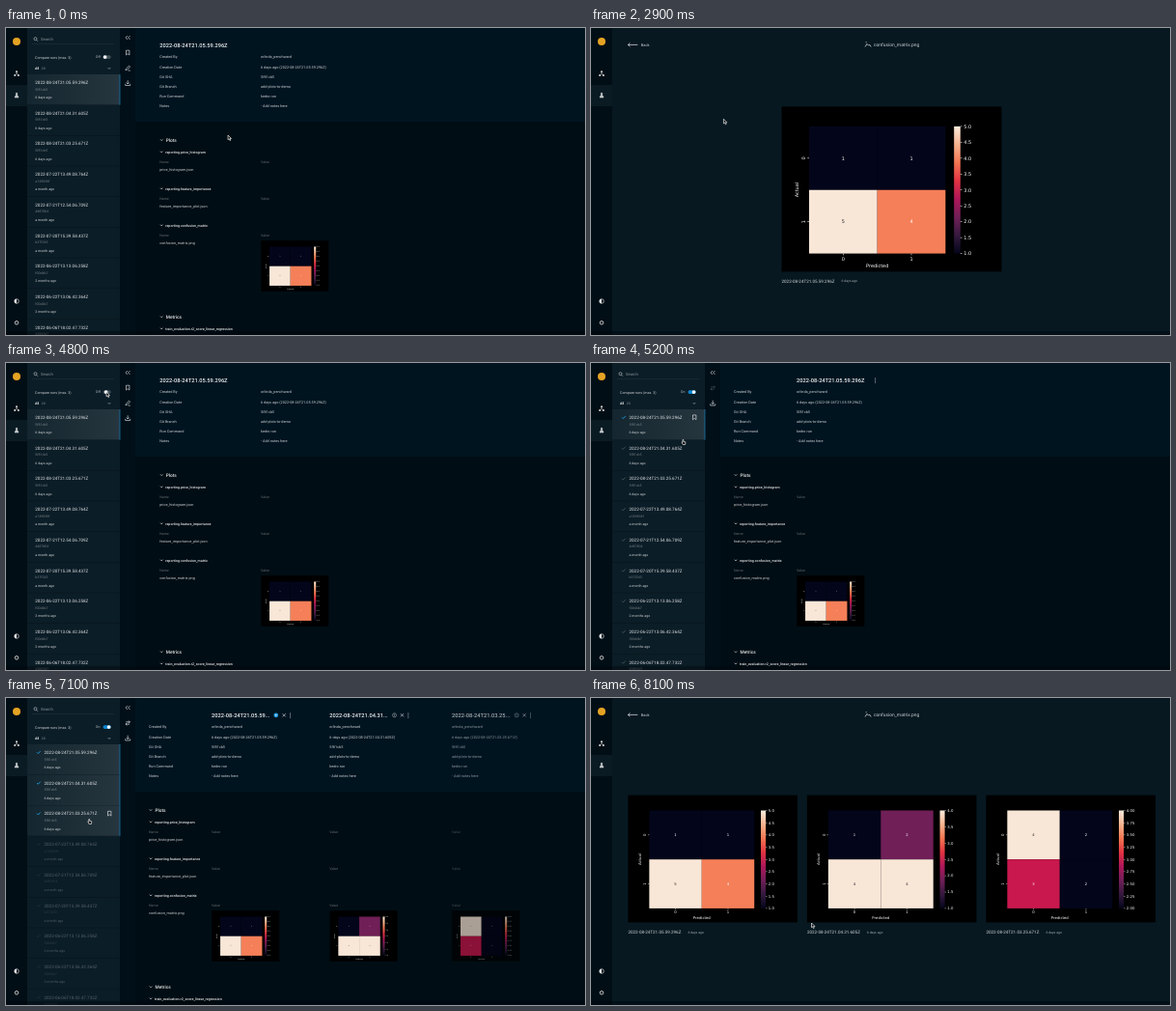
Animation, 600 px wide and 318 px high, one loop 8500 ms. Source, as an HTML page with a canvas:

```html
<!DOCTYPE html>
<html lang="en">
<head>
<meta charset="utf-8">
<title>Experiment tracking</title>
<style>
html, body { margin: 0; width: 100%; height: 100%; overflow: hidden; background: #000d14; }
canvas { display: block; }
</style>
</head>
<body>
<canvas id="stage" width="600" height="318"></canvas>
<script>
const ctx = document.getElementById('stage').getContext('2d');
ctx.textRendering = 'geometricPrecision';

const LOOP = 8500;
const SANS = 'Roboto, "Open Sans", sans-serif';
const PLOT = '"DejaVu Sans", sans-serif';
const BLUE = '#1e9be0';
const ROW_TOP = 48, ROW_H = 31.7;
const COLS = [213, 335.3, 455.7];
const ROCKET = ['#03051a', '#35193e', '#701f57', '#ad1759', '#e13342', '#f37651', '#f6b48f', '#faebdd'];

const RUNS = [
  ['2022-08-24T21.05.59.296Z', '5f81cb5', '6 days ago'],
  ['2022-08-24T21.04.31.605Z', '5f81cb5', '6 days ago'],
  ['2022-08-24T21.03.25.671Z', '5f81cb5', '6 days ago'],
  ['2022-07-22T13.49.08.764Z', 'a749838f', 'a month ago'],
  ['2022-07-21T12.54.06.709Z', '4d87804', 'a month ago'],
  ['2022-07-20T15.39.58.437Z', 'b37f243', 'a month ago'],
  ['2022-06-22T13.13.06.258Z', 'f00d4b7', '2 months ago'],
  ['2022-06-22T13.06.42.364Z', 'f00d4b7', '2 months ago'],
  ['2022-06-06T18.02.47.732Z', '43865d7', '2 months ago']
];
const PLOTS = [
  { values: [1, 1, 5, 4], fills: ['#03051a', '#03051a', '#f8e6d7', '#f47f58'], lo: 1, hi: 5, step: .5, digits: 1 },
  { values: [1, 2, 4, 4], fills: ['#03051a', '#701f57', '#f8e6d7', '#f8e6d7'], lo: 1, hi: 4, step: .5, digits: 1 },
  { values: [4, 2, 3, 2], fills: ['#f8e6d7', '#03051a', '#c9184e', '#03051a'], lo: 2, hi: 4, step: .25, digits: 2 }
];

// Pointer stops: time, x, y
const POINTER = [
  [0, 230, 111], [550, 230, 111], [1000, 302.5, 232.5], [2250, 302.5, 232.5],
  [2500, 181, 131.5], [2750, 181, 131.5], [3150, 44.8, 15], [4050, 44.8, 15],
  [4300, 103, 36.5], [4500, 104, 30], [4900, 104, 30], [5200, 94, 79.5],
  [5600, 86, 100], [6050, 86, 100], [6450, 84.8, 125.5], [7450, 84.8, 125.5],
  [7900, 228.5, 233], [LOOP, 228.5, 233]
];

const clamp = v => Math.min(1, Math.max(0, v));
const smooth = v => v * v * (3 - 2 * v);
const white = a => `rgba(255,255,255,${a})`;

function pointerAt(t) {
  const i = POINTER.findIndex((p, n) => n && t <= p[0]);
  const [t0, x0, y0] = POINTER[i - 1], [t1, x1, y1] = POINTER[i];
  const k = smooth((t - t0) / (t1 - t0));
  return [x0 + (x1 - x0) * k, y0 + (y1 - y0) * k];
}

function box(x, y, w, h, fill) {
  ctx.fillStyle = fill;
  ctx.fillRect(x, y, w, h);
}

// y is the middle of the capitals
function text(s, x, y, size, color = white(.8), { weight = 400, align = 'left', family = SANS } = {}) {
  ctx.font = `${weight} ${size}px ${family}`;
  ctx.textAlign = align;
  ctx.fillStyle = color;
  ctx.fillText(s, x, y + size * .36);
}

function icon(d, x, y, { stroke = white(.8), fill, width = .7 } = {}) {
  const path = new Path2D(d);
  ctx.save();
  ctx.translate(x, y);
  if (fill) { ctx.fillStyle = fill; ctx.fill(path); }
  if (stroke) { ctx.strokeStyle = stroke; ctx.lineWidth = width; ctx.stroke(path); }
  ctx.restore();
}

function dot(x, y, r, fill) {
  ctx.fillStyle = fill;
  ctx.beginPath();
  ctx.arc(x, y, r, 0, 7);
  ctx.fill();
}

function faded(alpha, draw) {
  ctx.save();
  ctx.globalAlpha *= alpha;
  draw();
  ctx.restore();
}

// Heatmap drawn on a 640 x 480 sheet
function matrix(x, y, w, { values, fills, lo, hi, step, digits }) {
  const label = (s, px, py, color = '#fff', align = 'center') =>
    text(s, px, py, 13.9, color, { align, family: PLOT });
  const turned = (s, px, py) => {
    ctx.save();
    ctx.translate(px, py);
    ctx.rotate(-Math.PI / 2);
    label(s, 0, 0);
    ctx.restore();
  };
  ctx.save();
  ctx.translate(x, y);
  ctx.scale(w / 640, w / 640);
  box(0, 0, 640, 480, '#000');
  values.forEach((v, i) => {
    const cx = 80 + i % 2 * 198.4, cy = 57.6 + (i >> 1) * 184.8;
    box(cx, cy, 198.4, 184.8, fills[i]);
    label(v, cx + 99.2, cy + 92.4, fills[i] === '#f8e6d7' ? '#262626' : '#fff');
  });
  for (const i of [0, 1]) {
    const tx = 179.2 + i * 198.4, ty = 150 + i * 184.8;
    box(tx - .8, 427.2, 1.6, 5, '#fff');
    box(75, ty - .8, 5, 1.6, '#fff');
    label(i, tx, 442);
    turned(i, 63, ty);
  }
  label('Predicted', 278.4, 462);
  turned('Actual', 43, 242);
  const ramp = ctx.createLinearGradient(0, 427.2, 0, 57.6);
  ROCKET.forEach((c, i) => ramp.addColorStop(i / 7, c));
  box(501.6, 57.6, 18.5, 369.6, ramp);
  for (let v = lo; v <= hi; v += step) {
    const ty = 427.2 - 369.6 * (v - lo) / (hi - lo);
    box(520, ty - .8, 5, 1.6, '#fff');
    label(v.toFixed(digits), 530, ty, '#fff', 'left');
  }
  ctx.restore();
}

function rail() {
  box(0, 0, 22, 318, '#020e15');
  box(0, 59, 22, 22, '#0a1b24');
  dot(11, 14, 4, '#e5a323');
  icon('M0-1.6V0M-1.7 1.6 0-.2 1.7 1.6', 11, 47.3, { width: .6 });
  for (const [x, y] of [[11, 45.3], [9.1, 49.1], [12.9, 49.1]]) dot(x, y, 1, white(.85));
  icon('M-.9-2.4H.9M-.6-2.3V-.5L-2 2.2H2L.6-.5V-2.3', 11, 69.8, { fill: white(.7), width: .6 });
  icon('M2.3 0A2.3 2.3 0 1 1-2.3 0 2.3 2.3 0 1 1 2.3 0', 11, 283);
  icon('M0-2.3A2.3 2.3 0 0 0 0 2.3Z', 11, 283, { fill: white(.85), stroke: null });
  icon('M1.8 0A1.8 1.8 0 1 1-1.8 0 1.8 1.8 0 1 1 1.8 0', 11, 305.3, { width: .9 });
}

const BOOKMARK = 'M-1.7-2.4H1.7V2.4L0 1-1.7 2.4Z';
const CHECK = 'M-1.8 0-.5 1.3 1.9-1.3';
const DOWN = 'M-1.2-.6 0 .6 1.2-.6';
const DOWNLOAD = 'M0-2.8V1M-1.5-.5 0 1 1.5-.5M-2.5 .8V2.5H2.5V.8';

function runList(compare, picked, hover, t) {
  box(22, 0, 96, 318, '#0b1d27');
  icon('M1.2-.3A1.5 1.5 0 1 1-1.8-.3 1.5 1.5 0 1 1 1.2-.3M.8 .9 2.2 2.3', 30.8, 11.5, { stroke: white(.65) });
  text('Search', 36, 11.7, 4.2, white(.5));
  box(27, 16, 85, .5, white(.1));
  text('Compare runs (max. 3)', 30, 30.2, 3.7);
  const on = smooth(clamp((t - 4750) / 150));
  text(on > .5 ? 'On' : 'Off', 93, 30.2, 3.6, white(.7));
  ctx.beginPath();
  ctx.roundRect(100.5, 28.2, 8.2, 3.8, 1.9);
  ctx.fillStyle = on > .5 ? '#0a85cf' : '#42515a';
  ctx.fill();
  dot(102.6 + 4 * on, 30.1, 1.9, '#f2f4f5');
  text('All', 30, 41.8, 3.6, white(.9), { weight: 700 });
  text('20', 36.8, 41.8, 3.4, white(.55));
  icon(DOWN, 107, 41.8, { width: .6 });

  RUNS.forEach(([name, hash, ago], i) => {
    const top = ROW_TOP + i * ROW_H, x = compare ? 39.5 : 30.3;
    const chosen = i < picked;
    if (chosen || i === hover) {
      const shade = ctx.createLinearGradient(22, 0, 118, 0);
      shade.addColorStop(0, '#14262f');
      shade.addColorStop(1, chosen ? '#26363f' : '#1f3039');
      box(22, top, 96, ROW_H, shade);
    }
    box(22, top + ROW_H - .4, 96, .5, 'rgba(0,8,14,.5)');
    faded(picked === 3 && !chosen ? .35 : 1, () => {
      if (compare) icon(CHECK, 33.8, top + 8.3, { stroke: chosen ? BLUE : white(.35), width: chosen ? .9 : .6 });
      text(name, x, top + 8.4, 4.55, white(.85));
      text(hash, x, top + 15.4, 3.55, white(.42));
      text(ago, x, top + 24, 3.55, white(.8));
    });
    if (compare && i === hover) icon(BOOKMARK, 107.2, top + 8.3);
  });

  box(118, 0, 16, 318, '#000f18');
  box(117.6, ROW_TOP, .8, picked * ROW_H, '#1877ad');
  icon('M-.3-2-2.3 0-.3 2M2.3-2 .3 0 2.3 2', 126.2, 10);
  if (compare) {
    icon('M-1.9-1H2.2M.9-2.3 2.2-1 .9 .3M1.9 1.3H-2.2M-.9 0-2.2 1.3-.9 2.6', 126.2, 25.8,
      { stroke: white(picked > 1 ? .9 : .25) });
    icon(DOWNLOAD, 126.2, 41.5);
  } else {
    icon(BOOKMARK, 126.2, 25.6);
    icon('M-2.3 2.3-1.8 .7 1.3-2.4 2.4-1.3-.7 1.8ZM.3 2.6H2.6', 126.2, 41.5);
    icon(DOWNLOAD, 126.2, 57);
  }
}

function runColumn(i, x, compare, many, dimmed) {
  const [name, hash, ago] = RUNS[i];
  const title = many ? name.slice(0, 19) + '...' : name;
  text(title, compare ? x : 159.2, 18.2, 5.7, white(.92), { weight: 500 });
  if (compare) {
    for (const dy of [-2, 0, 2]) dot(x + 81.6, 18 + dy, .5, white(.9));
  }
  if (many) {
    if (i) icon('M2 0A2 2 0 1 1-2 0 2 2 0 1 1 2 0M0-1V.8', x + 67.2, 17.8, { stroke: white(.65), width: .6 });
    else { dot(x + 66.8, 17.8, 2.4, BLUE); dot(x + 66.8, 17.8, .8, '#e8f4fb'); }
    icon('M-1.6-1.6 1.6 1.6M1.6-1.6-1.6 1.6', x + 75.2, 17.8);
  }
  ['orlinda_penchward', `${ago} (${name})`, hash, 'add-plots-to-demo', 'kedro run', '- Add notes here']
    .forEach((s, n) => text(s, x, 30 + n * 10.15, 3.8));
  for (const y of [139, 177, 215]) text('Value', x, y, 3.6, white(.38));
  faded(dimmed ? .78 : 1, () => matrix(x + .3, 220.2, 70, PLOTS[i]));
}

function details(compare, picked, since, dimmed) {
  box(134, 0, 466, 318, '#000d14');
  box(134, 0, 466, 97, '#001420');
  const x = compare ? 148 : 159.2;
  ['Created By', 'Creation Date', 'Git SHA', 'Git Branch', 'Run Command', 'Notes']
    .forEach((s, n) => text(s, x, 30 + n * 10.15, 3.8));
  for (const [s, y] of [['Plots', 116], ['Metrics', 299.2]]) {
    icon(DOWN, x + 2, y, { width: .8 });
    text(s, x + 6.5, y, 4.8, white(.9), { weight: 500 });
  }
  [['reporting.price_histogram', 128.3, 'price_histogram.json'],
   ['reporting.feature_importance', 166.3, 'feature_importance_plot.json'],
   ['reporting.confusion_matrix', 204.3, 'confusion_matrix.png'],
   ['train_evaluation.r2_score_linear_regression', 311.3]].forEach(([s, y, file]) => {
    icon(DOWN, x + 2, y, { width: .8 });
    text(s, x + 6, y, 3.6, white(.92), { weight: 500 });
    if (!file) return;
    text('Name', x, y + 10.8, 3.6, white(.38));
    text(file, x, y + 18.8, 3.8);
  });
  for (let i = 0; i < picked; i++) {
    const k = i ? smooth(clamp(since[i] / 400)) : 1;
    const cx = compare ? COLS[i] + 20 * (1 - k) : 264;
    faded(k, () => runColumn(i, cx, compare, picked > 1, dimmed && !i));
  }
}

function modal(count) {
  box(22, 0, 578, 318, '#071821');
  icon('M10 0H0M2-1.9 0 0 2 1.9', 38.4, 17.4, { width: .8 });
  text('Back', 51.8, 17.6, 4);
  icon('M-3 2.5-1-.6 .6 1.2 1.6 .2 3.2 2.5M-2.3-2.3H-1.3', 287, 17, { width: .8 });
  text('confusion_matrix.png', 293, 17.4, 4.9);
  const [x0, y, w, captionY] = count === 1 ? [197.5, 81.4, 228, 262.2] : [38.4, 100.7, 175.6, 242.6];
  for (let i = 0; i < count; i++) {
    const x = x0 + i * 185.5;
    matrix(x, y, w, PLOTS[i]);
    text(RUNS[i][0], x, captionY, 4.55);
    text(RUNS[i][2], x + 62, captionY, 3.45, white(.65));
  }
}

function pointer(x, y, hand) {
  const shape = hand
    ? 'M1 0V2.6L0 2.4 1.2 5H3.6L4 2.4 1.9 1.9V0Z'
    : 'M0 0V4.7L1.1 3.8 2 5.6 2.8 5.2 2 3.5H3.5Z';
  icon(shape, x, y, { fill: '#111', stroke: '#e8e8e8', width: .7 });
}

function frame(now) {
  const t = now % LOOP;
  const [px, py] = pointerAt(t);
  const single = t >= 1200 && t < 3300, triple = t >= 8090;
  const compare = t >= 4850;
  const since = [t, t - 5800, t - 6850];
  const picked = since.filter(s => s >= 0).length;
  const inList = px > 22 && px < 118 && py > ROW_TOP;
  const hover = compare && inList ? Math.floor((py - ROW_TOP) / ROW_H) : -1;
  const thumbX = compare ? COLS[0] : 264;
  const onThumb = px > thumbX && px < thumbX + 70 && py > 220 && py < 273;

  if (single || triple) modal(triple ? 3 : 1);
  else {
    details(compare, picked, since, onThumb);
    runList(compare, picked, hover, t);
  }
  rail();
  box(0, 314, 600, 4, 'rgba(0,6,10,.4)');
  pointer(px, py, (single && t < 1900) || (!single && hover >= 0));
  requestAnimationFrame(frame);
}
requestAnimationFrame(frame);
</script>
</body>
</html>
```
